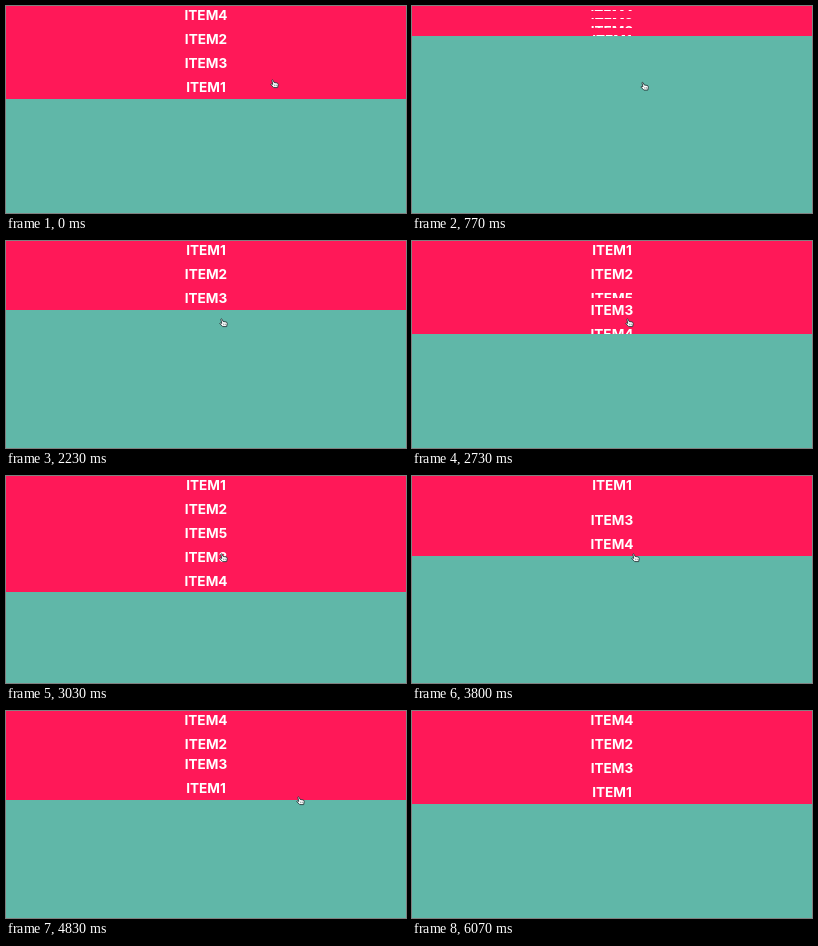
Write an HTML page that moves like this. It is 400x207 px and loops after 6810 ms.

```html
<!DOCTYPE html>
<html lang="en">
<head>
<meta charset="utf-8">
<title>List transitions</title>
<style>
html, body { margin: 0; width: 100%; height: 100%; overflow: hidden; background: #60b7a8; }
ul {
  margin: -3px 0 0; padding: 0; list-style: none; background: #ff1858;
  color: #fff; font: 700 13.6px/24px Inter, "Open Sans", sans-serif; text-align: center;
}
li { height: 0; overflow: hidden; }
svg { position: absolute; left: -5px; top: -5px; width: 10px; height: 10px; overflow: visible; }
</style>
</head>
<body>
<ul><li></li><li></li><li></li><li></li><li></li></ul>
<svg viewBox="0 0 10 10">
  <path d="M2.3 1.2Q3.1.5 3.7 1.4L4.6 3.5 7.4 3.9Q8.7 4.2 8.7 5.4L8.2 8.6H4.2L1.3 5.6Q1.5 4.7 2.4 5L3.3 5.4Z"
    fill="#fff" stroke="#26383a" stroke-width=".9" stroke-linejoin="round"/>
  <path d="M5.2 5.6V7.2M6.8 5.7V7.2" stroke="#26383a" stroke-width=".5"/>
</svg>
<script>
const LOOP = 6810, ROW = 24, DURATION = 600;

// start time, rows on show, rows growing, rows shrinking
const steps = [
  [0, '4231', '', ''],
  [630, '4231', '', '4231'],
  [1637, '123', '123', ''],
  [2637, '12534', '54', ''],
  [3615, '12534', '', '25'],
  [4613, '4231', '2', '']
];

// time, x, y of the pointer
const path = [
  [0, 268.5, 78], [230, 268.5, 78], [1070, 218, 81.5], [1469, 218, 81.5],
  [1470, 217.5, 82], [3400, 217.5, 82], [3700, 223.5, 82], [4100, 223.5, 82],
  [4830, 294.5, 90], [5170, 407, 87]
];

const items = [...document.querySelectorAll('li')];
const hand = document.querySelector('svg');
const easeOut = p => 1 - (1 - p) ** 4;
const smooth = p => p * p * (3 - 2 * p);

function drawList(t) {
  const [start, rows, grow, shrink] = steps.findLast(s => s[0] <= t);
  const p = easeOut(Math.min(1, (t - start) / DURATION));
  items.forEach((li, i) => {
    const id = rows[i];
    const size = !id ? 0 : grow.includes(id) ? p : shrink.includes(id) ? 1 - p : 1;
    li.textContent = id ? 'ITEM' + id : '';
    li.style.height = size * ROW + 'px';
  });
}

function drawHand(t) {
  const i = path.findIndex(k => k[0] > t);
  hand.style.display = i < 0 ? 'none' : '';
  if (i < 0) return;
  const [t0, x0, y0] = path[i - 1], [t1, x1, y1] = path[i];
  const p = smooth((t - t0) / (t1 - t0));
  hand.style.transform = `translate(${x0 + (x1 - x0) * p}px, ${y0 + (y1 - y0) * p}px)`;
}

const begin = performance.now();
function frame() {
  const t = (performance.now() - begin) % LOOP;
  drawList(t);
  drawHand(t);
  requestAnimationFrame(frame);
}
frame();
</script>
</body>
</html>
```
